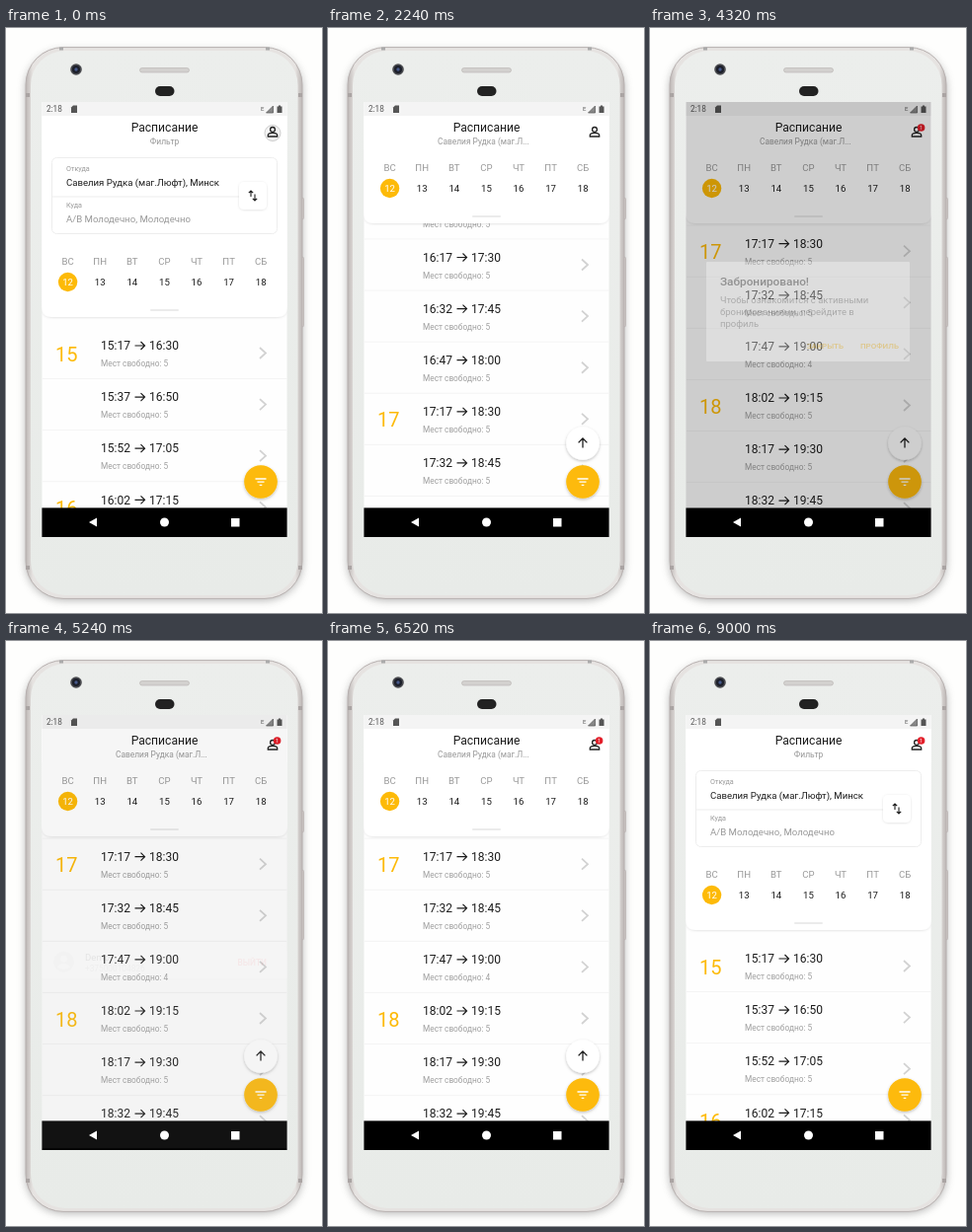
Write an HTML page that moves like this. It is 320 px wide and 593 px high and loops after 10 s.

```html
<!DOCTYPE html>
<html lang="ru">
<head>
<meta charset="utf-8">
<style>
html, body { margin: 0; width: 100%; height: 100%; overflow: hidden; background: #fefefd; }
svg { display: block; width: 320px; height: 593px; font-family: Roboto, "Noto Sans", sans-serif; }
</style>
</head>
<body>
<script>
const LOOP = 10000, YELLOW = '#fdba08', INK = '#1c1c1c', GREY = '#999';
const STOP = 'Савелия Рудка', PLACE = `${STOP} (маг.Люфт)`;

// y is the middle of the capitals
const text = (x, y, size, str, fill = INK, more = '') =>
  `<text x="${x}" y="${y + size * .355}" font-size="${size}" fill="${fill}" ${more}>${str}</text>`;
const rect = (x, y, w, h, fill, r = 0, more = '') =>
  `<rect x="${x}" y="${y}" width="${w}" height="${h}" fill="${fill}" rx="${r}" ${more}/>`;
const circle = (x, y, r, fill, more = '') => `<circle cx="${x}" cy="${y}" r="${r}" fill="${fill}" ${more}/>`;
const path = (d, fill, more = '') => `<path d="${d}" fill="${fill}" ${more}/>`;
const line = (d, stroke, w = 1, more = '') => path(d, 'none', `stroke="${stroke}" stroke-width="${w}" ${more}`);
const group = (id, body, more = '') => `<g id="${id}" ${more}>${body}</g>`;
const MID = 'text-anchor="middle" ', END = 'text-anchor="end" ', BOLD = 'font-weight="500" ';
const SHADE = 'filter="url(#shade)"', SOFT = 'filter="url(#soft)"';
const scrim = id => rect(36, 75, 249, 411, '#000', 0, `id="${id}" opacity="0"`);

function body() {
  const bands = [[20, 66], [20, 545], [296, 66], [296, 545]].map(([x, y]) => rect(x, y, 4, 4, '#aaa4a3')).join('');
  const key = (y, h) => rect(298, y, 3.5, h, '#d2cccb', 1.5, 'stroke="#b0a9a8" stroke-width=".6"');
  return rect(20, 23, 280, 557, '#666', 38, 'filter="url(#glow)" opacity=".5"')
    + key(172, 22) + key(232, 71)
    + rect(20, 19.6, 280, 558.8, 'url(#metal)', 38, 'stroke="#b8b1b0"') + bands
    + rect(25, 23, 270.5, 552, 'url(#face)', 35)
    + rect(54, 19.5, 4, 3, '#aaa') + rect(263, 19.5, 4, 3, '#aaa')
    + circle(71, 42, 5.8, '#4a4b4f') + circle(71, 42, 4, '#1c1f2a') + circle(71, 42, 1.7, '#47598a')
    + rect(135.5, 40.500, 50, 4.500, '#d3d1cf', 2.2, 'stroke="#b5b1af" stroke-width=".6"')
    + rect(151, 59, 19.5, 10, '#222', 5);
}

function rows() {
  const starts = ['15:17', '15:37', '15:52', '16:02', '16:17', '16:32', '16:47', '17:17',
    '17:32', '17:47', '18:02', '18:17', '18:32', '18:47'];
  let hour;
  return starts.map((start, i) => {
    const y = 322 + i * 52.1, [h, m] = start.split(':').map(Number), end = h * 60 + m + 73;
    const stop = `${end / 60 | 0}:${String(end % 60).padStart(2, '0')}`;
    const label = h === hour ? '' : text(50, y + 8.5, 20, h, YELLOW);
    hour = h;
    return label + text(96, y, 12, start) + text(145, y, 12, stop)
      + line(`M130.5 ${y}h10m-4 -4l4 4l-4 4`, INK, 1.2)
      + text(96, y + 18.2, 8.3, `Мест свободно: ${start === '17:47' ? 4 : 5}`, '#a0a0a0')
      + line(`M257 ${y + 2}l6 5.5l-6 5.5`, '#d2d2d2', 1.8)
      + line(`M37 ${y + 33.5}h248`, '#f1f1f1', .8);
  }).join('');
}

function filterCard() {
  return rect(46.5, 131.5, 228, 77, '#fff', 5, 'stroke="#ededed"')
    + line('M47 171h190', '#ededed')
    + text(61, 142, 7.2, 'Откуда', GREY) + text(61, 157, 9.6, `${PLACE}, Минск`)
    + text(61, 179.5, 7.2, 'Куда', GREY) + text(61, 194, 9.6, 'А/В Молодечно, Молодечно', GREY)
    + rect(236, 156, 28, 28, '#fff', 5, SOFT)
    + line('M248 171v-6m-2.2 2.2l2.2 -2.2l2.2 2.2M252 168.5v6.5m-2.2 -2.2l2.2 2.2l2.2 -2.2', INK, 1.1);
}

function days() {
  return ['ВС', 'ПН', 'ВТ', 'СР', 'ЧТ', 'ПТ', 'СБ'].map((day, i) => {
    const x = 62.6 + i * 32.6;
    return text(x, 237, 9.6, day, GREY, MID) + (i ? '' : circle(x, 257.5, 9.7, YELLOW))
      + text(x, 258, 9.6, 12 + i, i ? INK : '#fff', MID);
  }).join('');
}

function topBar() {
  const person = circle(270, 102.9, 2.4, 'none', 'stroke="#222" stroke-width="1.3"')
    + line('M265.3 110v-1.300c0-3 9.400-3 9.400 0v1.300z', '#222', 1.3);
  return rect(36, 89, 249, 34, '#fff')
    + text(160.5, 100.8, 12.1, 'Расписание', INK, MID)
    + group('subFilter', text(160.5, 114.8, 8.5, 'Фильтр', GREY, MID))
    + group('subPlace', text(111, 114.8, 8.4, `${STOP} (маг.Т...`.replace('Т.', 'Л.'), GREY))
    + group('ripple', circle(270, 106.5, 8, '#f4f4f4', 'stroke="#ccc"')) + person
    + group('badge', circle(274.6, 101, 3.8, '#e3202b') + text(274.6, 101, 5.5, 1, '#fff', MID))
    + rect(36, 75, 249, 14, '#f4f4f4')
    + text(41, 82.3, 8.2, '2:18', '#555')
    + path('M66 80.5l2-2h4v7.5h-6z', '#555')
    + text(258, 82.3, 6, 'E', '#555')
    + path('M263.5 86h7v-7z', '#888', 'stroke="#555" stroke-width=".7"')
    + path('M274.5 79.5h1.5v-1h2v1h1.5v6.5h-5z', '#555');
}

function buttons() {
  return group('up', circle(258, 421, 16.8, '#fff', SHADE)
      + line('M258 425.500v-9.500m-4.400 4.400l4.400 -4.400l4.400 4.400', INK, 1.3))
    + circle(258, 460, 16.8, YELLOW, SHADE)
    + line('M252.5 457h11m-9 3.2h7m-4.8 3.2h2.6', '#fff', 1.3);
}

function booking() {
  const facts = ['Дата: 2020-04-12', 'Отправление: 17:47', 'Прибытие: 19:00', `Остановка: ${PLACE}`, 'Кол-во пассажиров:'];
  const seat = n => {
    const x = 45.5 + n * 24, on = n === 1;
    return rect(x, 317.5, 19, 18.5, on ? YELLOW : '#fff', 2, `stroke="${on ? YELLOW : '#bbb'}"`)
      + text(x + 9.5, 327, 9.6, n, on ? '#fff' : GREY, MID + BOLD);
  };
  return rect(52.5, 183.5, 215.5, 208, '#fff', 1)
    + text(67, 203.5, 11.9, 'Бронирование', INK, BOLD)
    + facts.map((f, i) => text(67, 232 + i * 18, 9.25, f)).join('')
    + [1, 2, 3].map(seat).join('')
    + rect(67.5, 352.5, 89, 21, '#fff', 2, 'stroke="#ccc"') + text(112, 363, 9.2, 'Назад', GREY, MID + BOLD)
    + rect(164, 352, 90, 22, YELLOW, 2) + text(209, 363, 9.2, 'Бронь', '#fff', MID + BOLD);
}

function notice() {
  const lines = ['Чтобы ознакомится с активными', 'бронированиями, перейдите в', 'профиль'];
  return rect(57, 237, 206, 101, '#fff', 1)
    + text(71, 257, 11.8, 'Забронировано!', INK, BOLD)
    + lines.map((s, i) => text(71, 276 + i * 12, 9.5, s, '#666')).join('')
    + text(196, 322, 8, 'ЗАКРЫТЬ', YELLOW, BOLD + END)
    + text(252, 322, 8, 'ПРОФИЛЬ', YELLOW, BOLD + END);
}

function sheet() {
  const screenRows = [347, 356, 384].map(y => rect(146, y, 29, 7, '#bcd4fb', 1)).join('');
  const picture = path('M106 381q8 29 54 29t54-29z', '#e6e6e4')
    + path('M144 329.500h33q4 0 4 4l1.500 76h-43.500l1.500-76q0-4 3.500-4z', '#4b8bf0')
    + path('M144 333h33l1.500 76h-36z', '#f6f9ff') + rect(154, 333, 13, 2.5, '#4b8bf0', 1.2)
    + screenRows + rect(144, 367, 35, 14, '#4283ee', 1)
    + path('M153 371q2-2 4 0l18 14 6-6q3-1 4 3l2 6 15 10-19 11q-12 0-17-6l-13-4q-1-4 4-4l9 1-14-22z', '#f0d596');
  const empty = picture + text(160.5, 424.5, 12, 'Нет активных броней', INK, MID)
    + text(160.5, 443, 8.4, 'Поспешите забронировать рейс', GREY, MID)
    + rect(124, 459, 73, 21.5, YELLOW, 2) + text(160.5, 470, 9.3, 'Расписание', '#fff', MID + BOLD);
  const booked = text(55, 372, 10.5, 'Отправление: 17:47', INK, BOLD)
    + text(55, 395, 9, 'Прибытие: 19:00') + text(55, 412, 8.4, 'Дата: 2020-04-12', GREY);
  return path('M36 489V290q0-7 7-7h235q7 0 7 7v199z', '#f1f1ef')
    + path('M36 317V290q0-7 7-7h235q7 0 7 7v27z', '#fcfcfc') + line('M36 317.5h249', '#dedede')
    + circle(58.5, 300, 10.5, '#cecece') + circle(58.5, 297, 3.4, '#fff') + path('M51.5 305q7-7 14 0q-7 5-14 0z', '#fff')
    + text(80, 295.5, 9.6, 'Demo') + text(80, 307, 8.3, '+375000104826', GREY)
    + text(264, 300.5, 8.4, 'ВЫЙТИ', '#fb4650', BOLD + END)
    + group('empty', empty) + group('booked', booked);
}

document.body.innerHTML = `<svg viewBox="0 0 320 593">
<defs>
  <linearGradient id="metal"><stop stop-color="#bcb6b4"/><stop offset=".025" stop-color="#e6e3e1"/>
    <stop offset=".975" stop-color="#e6e3e1"/><stop offset="1" stop-color="#bcb6b4"/></linearGradient>
  <linearGradient id="face" x2="0" y2="1"><stop stop-color="#eceeec"/><stop offset="1" stop-color="#e8ebe8"/></linearGradient>
  <filter id="glow" x="-20%" width="140%"><feGaussianBlur stdDeviation="4.5"/></filter>
  <filter id="shade" x="-30%" y="-30%" width="160%" height="170%">
    <feDropShadow dx="0" dy="1.3" stdDeviation="1.5" flood-opacity=".25"/></filter>
  <filter id="soft" x="-30%" y="-30%" width="160%" height="170%">
    <feDropShadow dx="0" dy=".5" stdDeviation=".8" flood-opacity=".13"/></filter>
  <clipPath id="screen">${rect(36.4, 75, 248.2, 441, '#000')}</clipPath>
</defs>
${body()}
<g clip-path="url(#screen)">
  ${rect(36, 75, 249, 441, '#fefefe')}
  ${group('list', rows())}
  ${group('panel', path('M36 60h249v222q0 11-11 11H47q-11 0-11-11z', '#fff', SOFT)
    + group('card', filterCard()) + days() + rect(146, 285, 29, 2, '#ebebeb', 1))}
  ${topBar()}
  ${buttons()}
  ${rect(36, 486.4, 249, 30, '#000')}
  ${scrim('dimBooking')}${group('booking', booking())}
  ${scrim('dimNotice')}${group('notice', notice())}
  ${scrim('dimSheet')}${group('sheet', sheet())}
  ${path('M84 501l8-4.5v9z', '#fff')}${circle(160.5, 501, 4.5, '#fff')}${rect(228, 497, 8.5, 8.5, '#fff')}
</g></svg>`;

const $ = id => document.getElementById(id);
const ramp = (t, a, b) => Math.min(1, Math.max(0, (t - a) / (b - a)));
const out = p => 1 - (1 - p) ** 3;
const smooth = p => p * p * (3 - 2 * p);
const fade = (id, v) => $(id).setAttribute('opacity', v);
const move = (id, y) => $(id).setAttribute('transform', `translate(0 ${y})`);
const zoom = (id, x, y, k) => $(id).setAttribute('transform', `translate(${x} ${y}) scale(${k}) translate(${-x} ${-y})`);

// The sheet slides a little while it fades, over the navigation bar too
function drawSheet(t) {
  const first = t < 4000, [start, end, close] = first ? [80, 440, 1160] : [5180, 5540, 6200];
  const open = ramp(t, start, end), shut = ramp(t, close, close + 320);
  const alpha = smooth(open) * (1 - shut ** 3);
  move('sheet', 44 * ((1 - open) ** 3 + shut * shut));
  fade('sheet', alpha);
  fade('dimSheet', .47 * alpha);
  fade('empty', first ? ramp(t, 400, 580) : 0);
  fade('booked', ramp(t, 5540, 5780));
}

function draw(t) {
  const scroll = 468 * (smooth(ramp(t, 1720, 2600)) - smooth(ramp(t, 8240, 9000)))
    - 6 * (out(ramp(t, 7000, 7200)) - ramp(t, 8240, 8500));
  const lift = Math.min(95, Math.max(0, scroll)), folded = lift / 95;
  move('list', -scroll);
  move('panel', -lift);
  fade('card', 1 - folded);
  fade('subFilter', 1 - folded);
  fade('subPlace', folded);
  const up = ramp(scroll, 95, 180);
  fade('up', up);
  zoom('up', 258, 421, .5 + .5 * up);
  fade('ripple', 1 - ramp(t, 40, 300));
  fade('badge', t >= 4200 ? 1 : 0);

  const ask = ramp(t, 2860, 3320) * (1 - ramp(t, 3840, 4160));
  fade('dimBooking', .6 * ask);
  fade('booking', ask);

  const shown = ramp(t, 4260, 4440), told = shown * (1 - ramp(t, 5080, 5240));
  fade('dimNotice', .57 * told);
  fade('notice', told);
  zoom('notice', 160, 287.5, .98 + .06 * shown);
  drawSheet(t);
}

const began = performance.now();
(function tick() {
  draw((performance.now() - began) % LOOP);
  requestAnimationFrame(tick);
})();
</script>
</body>
</html>
```
